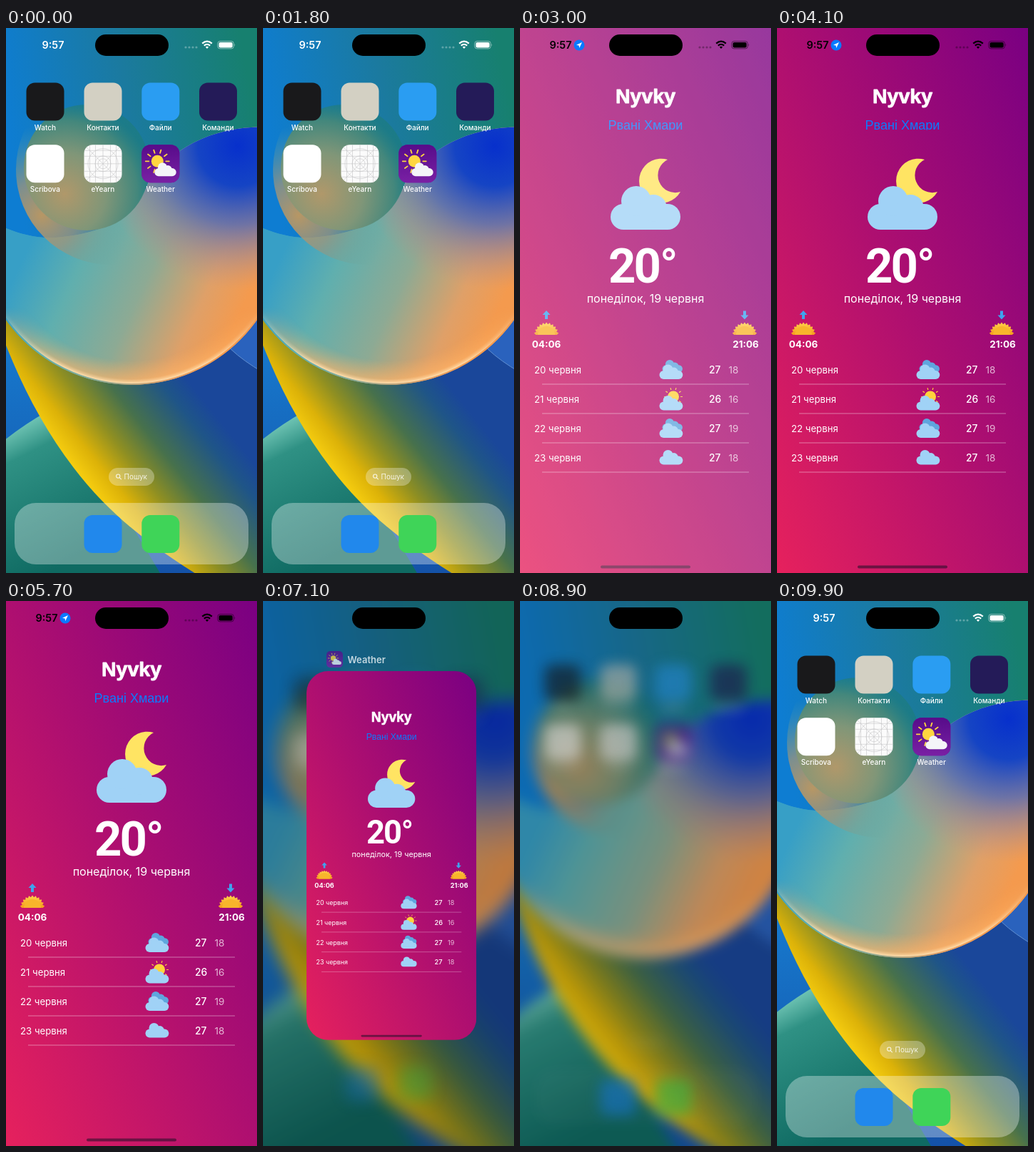
Write an HTML page that moves like this. It is 352 by 762 pixels and loops after 10000 ms.

```html
<!DOCTYPE html>
<html lang="uk">
<head>
<meta charset="utf-8">
<title>Weather</title>
<style>
html, body { margin: 0; width: 100%; height: 100%; overflow: hidden; background: #14506e; }
#stage { position: relative; width: 352px; height: 762px; overflow: hidden; }
#stage > *, #card > * { position: absolute; left: 0; top: 0; }
svg { display: block; overflow: visible; }
text { font-family: Inter, Roboto, sans-serif; }
.mid { text-anchor: middle; }
#wall { left: -40px; top: -40px; }
#home { transform-origin: 176px 381px; }
#dim { width: 352px; height: 762px; background: #000; }
#card { width: 352px; height: 762px; transform-origin: 0 0; overflow: hidden;
  background: linear-gradient(to bottom left, #7a0082, #ae0f70 50%, #e6215d); }
#veil { width: 352px; height: 762px; background: #fff; }
</style>
</head>
<body>
<div id="stage">
  <svg id="wall" width="432" height="842" viewBox="-40 -40 432 842">
    <defs>
      <linearGradient id="sky" gradientUnits="userSpaceOnUse" x1="0" y1="130" x2="340" y2="70">
        <stop offset="0" stop-color="#0e7dd2"/><stop offset=".5" stop-color="#1b7a9f"/><stop offset="1" stop-color="#17806f"/>
      </linearGradient>
      <linearGradient id="low" gradientUnits="userSpaceOnUse" x1="0" y1="450" x2="0" y2="760">
        <stop offset="0" stop-color="#1778cc"/><stop offset="1" stop-color="#1452a8"/>
      </linearGradient>
      <linearGradient id="gold" gradientUnits="userSpaceOnUse" x1="78" y1="614" x2="245" y2="480">
        <stop offset="0" stop-color="#fff08a"/><stop offset=".05" stop-color="#f8cf10"/><stop offset=".2" stop-color="#dcb208"/>
        <stop offset=".38" stop-color="#8f8f22"/><stop offset=".58" stop-color="#47714c"/><stop offset=".85" stop-color="#1f5587"/><stop offset="1" stop-color="#1a479a"/>
      </linearGradient>
      <linearGradient id="leaf" gradientUnits="userSpaceOnUse" x1="10" y1="560" x2="100" y2="740">
        <stop offset="0" stop-color="#6fc4b4"/><stop offset=".2" stop-color="#2f9184"/><stop offset="1" stop-color="#0f6a62"/>
      </linearGradient>
      <linearGradient id="body" gradientUnits="userSpaceOnUse" x1="20" y1="330" x2="300" y2="460">
        <stop offset="0" stop-color="#379fc6"/><stop offset=".25" stop-color="#60afae"/><stop offset=".55" stop-color="#8daa94"/>
        <stop offset=".82" stop-color="#dfa068"/><stop offset="1" stop-color="#f49a4e"/>
      </linearGradient>
      <radialGradient id="deep" gradientUnits="userSpaceOnUse" cx="325" cy="165" r="200">
        <stop offset="0" stop-color="#0730cc"/><stop offset=".28" stop-color="#1544c4"/><stop offset=".55" stop-color="#5a6bb0" stop-opacity=".85"/>
        <stop offset=".8" stop-color="#a08690" stop-opacity=".5"/><stop offset="1" stop-color="#c09080" stop-opacity="0"/>
      </radialGradient>
      <radialGradient id="rim" gradientUnits="userSpaceOnUse" cx="176" cy="283" r="214">
        <stop offset=".85" stop-color="#ffb060" stop-opacity="0"/><stop offset=".97" stop-color="#ffb468" stop-opacity=".6"/><stop offset="1" stop-color="#ffe0b0"/>
      </radialGradient>
      <linearGradient id="rimFade" gradientUnits="userSpaceOnUse" x1="0" y1="390" x2="0" y2="470">
        <stop offset="0" stop-color="#000"/><stop offset="1" stop-color="#fff"/>
      </linearGradient>
      <mask id="rimMask"><rect x="-40" y="380" width="432" height="140" fill="url(#rimFade)"/></mask>
      <radialGradient id="tan" gradientUnits="userSpaceOnUse" cx="50" cy="262" r="125">
        <stop offset="0" stop-color="#c0985f" stop-opacity=".95"/><stop offset=".4" stop-color="#a0957a" stop-opacity=".75"/><stop offset="1" stop-color="#5fa5a0" stop-opacity="0"/>
      </radialGradient>
      <radialGradient id="disc" gradientUnits="userSpaceOnUse" cx="82" cy="232" r="128">
        <stop offset="0" stop-color="#b0986a"/><stop offset=".45" stop-color="#809678"/><stop offset=".8" stop-color="#43877c"/><stop offset="1" stop-color="#1d7c78" stop-opacity=".6"/>
      </radialGradient>
    </defs>
    <rect x="-40" y="-40" width="432" height="842" fill="url(#sky)"/>
    <rect x="-40" y="385" width="432" height="417" fill="url(#low)"/>
    <path d="M-40 610Q10 560 75 527L240 802H-40Z" fill="url(#leaf)"/>
    <path d="M-40 330C-5 440 30 530 95 615S235 745 330 802H392V330Z" fill="url(#gold)"/>
    <path d="M300 432Q325 466 392 498V380H300Z" fill="#2a62bd" stroke="#5f8ed0"/>
    <path id="blob" d="M392 140C300 130 235 165 200 215C180 270 130 288 70 293C20 296-20 270-40 260V283A214 214 0 0 0 392 283Z" fill="url(#body)"/>
    <use href="#blob" style="fill:none"/>
    <path d="M392 140C300 130 235 165 200 215C180 270 130 288 70 293L100 420H392Z" fill="url(#deep)"/>
    <circle cx="176" cy="283" r="214" fill="url(#rim)" mask="url(#rimMask)"/>
    <circle cx="147" cy="198" r="133" fill="url(#tan)"/>
    <circle cx="113" cy="195" r="88" fill="url(#disc)"/>
  </svg>

  <svg id="home" width="352" height="762"></svg>
  <div id="dim"></div>

  <svg id="head" width="120" height="30">
    <svg width="23" height="23" viewBox="0 0 53 53"><use href="#wx"/></svg>
    <text x="29.5" y="16.5" font-size="13" font-weight="600" fill="#fff">Weather</text>
  </svg>

  <div id="card">
    <svg id="app" width="352" height="762"></svg>
    <div id="veil"></div>
    <svg id="cover" width="352" height="762" viewBox="0 0 53 114.73"><rect width="53" height="115" fill="#66169a"/><use href="#wx"/></svg>
  </div>

  <svg id="barApp" width="352" height="50"></svg>
  <svg id="barHome" width="352" height="50"></svg>
  <svg width="352" height="50"><rect x="125" y="9" width="103" height="30" rx="15"/></svg>

  <svg width="0" height="0">
    <defs>
      <linearGradient id="plum" x2="0" y2="1"><stop offset="0" stop-color="#570c8a"/><stop offset="1" stop-color="#7a20a4"/></linearGradient>
      <linearGradient id="amber" x2="0" y2="1"><stop offset="0" stop-color="#ffd34a"/><stop offset="1" stop-color="#f59a1c"/></linearGradient>
      <g id="cloud">
        <rect y="25" width="98" height="36" rx="18"/><circle cx="36" cy="21" r="21"/><circle cx="60" cy="31" r="19"/>
      </g>
      <g id="wx">
        <rect width="53" height="53" rx="12" fill="url(#plum)"/>
        <g id="wxSun"></g>
        <use href="#cloud" transform="translate(18 25) scale(.31)" fill="#f4f4f8"/>
      </g>
      <clipPath id="cut"><rect x="100" y="120" width="160" height="22.6"/></clipPath>
    </defs>
  </svg>
</div>

<script>
const $ = id => document.getElementById(id);
const fill = (id, html) => { $(id).innerHTML = html; };
const text = (x, y, size, str, attrs = '') =>
  `<text x="${x}" y="${y}" font-size="${size}" fill="#fff" ${attrs}>${str}</text>`;
const cloud = (x, y, k, color) =>
  `<use href="#cloud" transform="translate(${x} ${y}) scale(${k})" fill="${color}"/>`;

function sun(x, y, r, inner, outer, n, color, w) {
  let d = '';
  for (let i = 0; i < n; i++) {
    const a = i / n * 2 * Math.PI, c = Math.cos(a), s = Math.sin(a);
    d += `M${x + c * inner} ${y + s * inner}L${x + c * outer} ${y + s * outer}`;
  }
  return `<circle cx="${x}" cy="${y}" r="${r}" fill="${color}"/>
    <path d="${d}" stroke="${color}" stroke-width="${w}" stroke-linecap="round"/>`;
}

// Status bars
function bar(x, color) {
  const dots = [252, 257, 262, 267].map(c => `<circle cx="${c}" cy="27" r="1.6"/>`).join('');
  return text(x, 29, 14.4, '9:57', `class="mid" font-weight="600" style="fill:${color}"`) + `
    <g fill="${color}" opacity=".3">${dots}</g>
    <g fill="none" stroke="${color}" stroke-width="2.2">
      <path d="M275.2 21.6Q282 15.6 288.8 21.6M277.8 24.6Q282 21 286.2 24.6"/></g>
    <path d="M279.8 26.6Q282 24.8 284.2 26.6L282 29Z" fill="${color}"/>
    <rect x="296.9" y="18.5" width="22.4" height="10.4" rx="3.2" fill="none" stroke="${color}" stroke-opacity=".5"/>
    <rect x="298.5" y="20" width="19.2" height="7.4" rx="2" fill="${color}"/>
    <path d="M320.6 22V25.6Q322 23.8 320.6 22" fill="${color}" opacity=".6"/>`;
}
fill('barHome', bar(66, '#fff'));
fill('barApp', bar(57, '#000') + `<circle cx="83" cy="24" r="7.5" fill="#0a7aff"/>
  <path d="M87 20L79 23.8L82.6 24.4L83.2 28Z" fill="#fff"/>`);

// Home screen
const cols = [28.5, 109.5, 190.3, 271];
const tile = (x, y, color) => `<rect x="${x}" y="${y}" width="53" height="53" rx="12" fill="${color}"/>`;
const grid = [8, 16, 26.5, 37, 45].map(v => `M${v} 0V53M0 ${v}H53`).join('') + 'M3 3L50 50M50 3L3 50';
const apps = [
  ['Watch', '#19191b'], ['Контакти', '#d3d0c3'], ['Файли', '#2a9df2'], ['Команди', '#241b58'],
  ['Scribova', '#fff'], ['eYearn', '#fbfbfb'], ['Weather', '#66169a']
];
fill('wxSun', sun(22, 23, 8.5, 12, 16.5, 10, '#ffd640', 1.8));
fill('home', apps.map(([name, color], i) => {
  const x = cols[i % 4], y = i < 4 ? 76.5 : 163.3;
  return tile(x, y, color) + text(x + 26.4, y + 66, 10, name, 'class="mid" font-weight="500"');
}).join('') + `
  <g transform="translate(109.5 163.3)" fill="none" stroke="#c4c4c6" stroke-width=".6"><path d="${grid}"/>
    <circle cx="26.5" cy="26.5" r="21"/><circle cx="26.5" cy="26.5" r="11"/><circle cx="26.5" cy="26.5" r="7"/></g>
  <use href="#wx" transform="translate(190.3 163.3)"/>
  <g id="pill"><rect x="144" y="615" width="64" height="25" rx="12.5" fill="#fff" opacity=".3"/>
    <g fill="none" stroke="#fff" stroke-width="1.1" opacity=".85"><circle cx="157.2" cy="626.6" r="2.6"/><path d="M159.2 628.6L161.8 631.2"/></g>
    ${text(165.5, 631.3, 10, 'Пошук', 'opacity=".85"')}</g>
  <rect id="dock" x="12" y="664" width="328" height="86" rx="30" fill="#fff" opacity=".33"/>
  <g id="docked">${tile(109.5, 681, '#2188ec')}${tile(190.3, 681, '#3fd458')}</g>`);

// Weather screen
const SKY = '#a0d2f6', DARK = '#5fa5de';
function halfSun(x) {
  let d = '';
  for (let i = 0; i <= 22; i++) {
    const a = Math.PI * (1 + i / 22), r = i % 2 ? 17.4 : 14.8;
    d += `${i ? 'L' : 'M'}${x + r * Math.cos(a)} ${429 + r * Math.sin(a)}`;
  }
  return `<path d="${d}Z" fill="url(#amber)"/>
    <path d="M${x - 12} 429A12 12 0 0 1 ${x + 12} 429Z" fill="#f8b52b"/>`;
}
const arrow = (x, turn) => `<path d="M${x} 395L${x + 5.5} 401H${x + 2}V407H${x - 2}V401H${x - 5.5}Z"
  fill="#3fa3ee" transform="rotate(${turn} ${x} 401.2)"/>`;

const days = [[20, 27, 18, 'thick'], [21, 26, 16, 'sunny'], [22, 27, 19, 'thick'], [23, 27, 18, 'plain']];
const marks = {
  thick: y => cloud(199.5, y - 14, .29, DARK) + cloud(195.5, y - 7.5, .335, SKY),
  sunny: y => sun(215, y - 3.5, 8, 10.5, 12.5, 10, '#ffd23c', 1.2) + cloud(195.5, y - 5, .335, SKY),
  plain: y => cloud(195.5, y - 11, .335, SKY)
};
const rows = days.map(([day, hi, lo, mark], i) => {
  const y = 478 + i * 41;
  return text(20, y + 5, 13.2, day + ' червня') + marks[mark](y) +
    text(265, y + 5, 13.8, hi, 'font-weight="500"') +
    text(292.5, y + 5, 13.5, lo, 'opacity=".7"') +
    `<path d="M31 ${y + 20}H321" stroke="#fff" stroke-opacity=".42"/>`;
}).join('');

const big = 'font-family:Roboto,sans-serif;letter-spacing:-3px';
fill('app', `
  <text x="176" y="104.5" class="mid" font-size="28.5" font-weight="700" fill="#fff" stroke="#fff" stroke-width=".9"
    stroke-linejoin="round" style="font-family:'Liberation Sans',Arial,sans-serif">Nyvky</text>
  <text x="176" y="141.5" class="mid" font-size="18" fill="#0a7cff" clip-path="url(#cut)"
    style="font-family:'Liberation Sans',Arial,sans-serif">Рвані Хмари</text>
  <path d="M207 184A31 31 0 1 0 225 229A24.3 24.3 0 0 1 207 184Z" fill="#ffe463"/>
  ${cloud(127, 221, 1, SKY)}
  <text x="124" y="355.5" font-size="67" font-weight="700" fill="#fff" style="${big}">20<tspan x="196" font-weight="500">°</tspan></text>
  ${text(176, 384, 16, 'понеділок, 19 червня', 'class="mid"')}
  ${arrow(37, 0)}${halfSun(37)}${text(37, 447.3, 13.5, '04:06', 'class="mid" font-weight="700"')}
  ${arrow(315, 180)}${halfSun(315)}${text(316.5, 447.3, 13.5, '21:06', 'class="mid" font-weight="700"')}
  ${rows}
  <rect x="113" y="751.5" width="126" height="4" rx="2" fill="#28102a" opacity=".6"/>`);

// Motion: rows of [ms, value, easing to the next row]
const LOOP = 10000;
const OUT = 'cubic-bezier(.2,.7,.2,1)', SOFT = 'ease-in-out', QUICK = 'cubic-bezier(.4,0,.8,.6)';
function run(id, prop, steps) {
  const first = steps[0], last = steps[steps.length - 1];
  const all = [[0, first[1]], ...steps, [LOOP, last[1]]];
  $(id).animate(all.map(([t, v, easing = 'linear']) => ({ offset: t / LOOP, [prop]: v, easing })),
    { duration: LOOP, iterations: Infinity });
}
const at = (x, y, k) => `translate(${x}px,${y}px) scale(${k})`;
const inset = (b, r) => `inset(0px 0px ${b}px 0px round ${r}px)`;

run('card', 'transform', [
  [2230, at(190.3, 163.3, .1506), OUT], [2780, at(0, 0, 1)],
  [6430, at(0, 0, 1), 'ease-out'], [7100, at(61, 98, .677), SOFT], [7500, at(55.7, 113, .685)],
  [8430, at(55.7, 113, .685), QUICK], [8820, at(55.7, -560, .685)]
]);
run('card', 'clipPath', [
  [2230, inset(410, 80), OUT], [2780, inset(0, 0)], [6430, inset(0, 0)], [6550, inset(0, 45)], [8820, inset(0, 45)]
]);
run('card', 'opacity', [[2230, 0], [2270, 1], [8820, 1], [8830, 0]]);
run('cover', 'opacity', [[2280, 1], [2480, 0]]);
run('veil', 'opacity', [[2800, 1], [3000, .22], [3300, 0]]);

run('head', 'transform', [
  [6700, at(60, 40, 1), 'ease-out'], [7100, at(89, 70, 1), SOFT], [7500, at(84, 84, 1)],
  [8430, at(84, 84, 1), QUICK], [8820, at(84, -589, 1)]
]);
run('head', 'opacity', [[6850, 0], [7100, .75], [7300, 1], [8430, 1], [8700, 0]]);

const blur = n => `blur(${n}px)`;
run('wall', 'filter', [
  [2230, blur(0)], [2600, blur(12)], [8650, blur(12), SOFT], [9400, blur(0)]
]);
run('home', 'filter', [
  [2230, blur(0)], [2600, blur(12)], [8650, blur(12), SOFT], [9400, blur(0)]
]);
run('home', 'transform', [
  [2230, 'scale(1)', 'ease-out'], [2700, 'scale(.9)'], [7100, 'scale(.9)', SOFT],
  [7600, 'scale(.95)'], [8650, 'scale(.95)', SOFT], [9500, 'scale(1)']
]);
run('home', 'opacity', [[2230, 1], [2600, .45], [8650, .45, SOFT], [9300, 1]]);
for (const id of ['dock', 'pill']) {
  const full = id === 'dock' ? .33 : 1;
  run(id, 'opacity', [[2300, full], [2700, 0], [8700, 0, SOFT], [9400, full]]);
}
run('dim', 'opacity', [[2230, 0], [2600, .22], [8650, .22, SOFT], [9300, 0]]);
run('barHome', 'opacity', [[2250, 1], [2450, 0], [8900, 0], [9300, 1]]);
run('barApp', 'opacity', [[2450, 0], [2700, 1], [6450, 1], [6650, 0]]);
</script>
</body>
</html>
```
